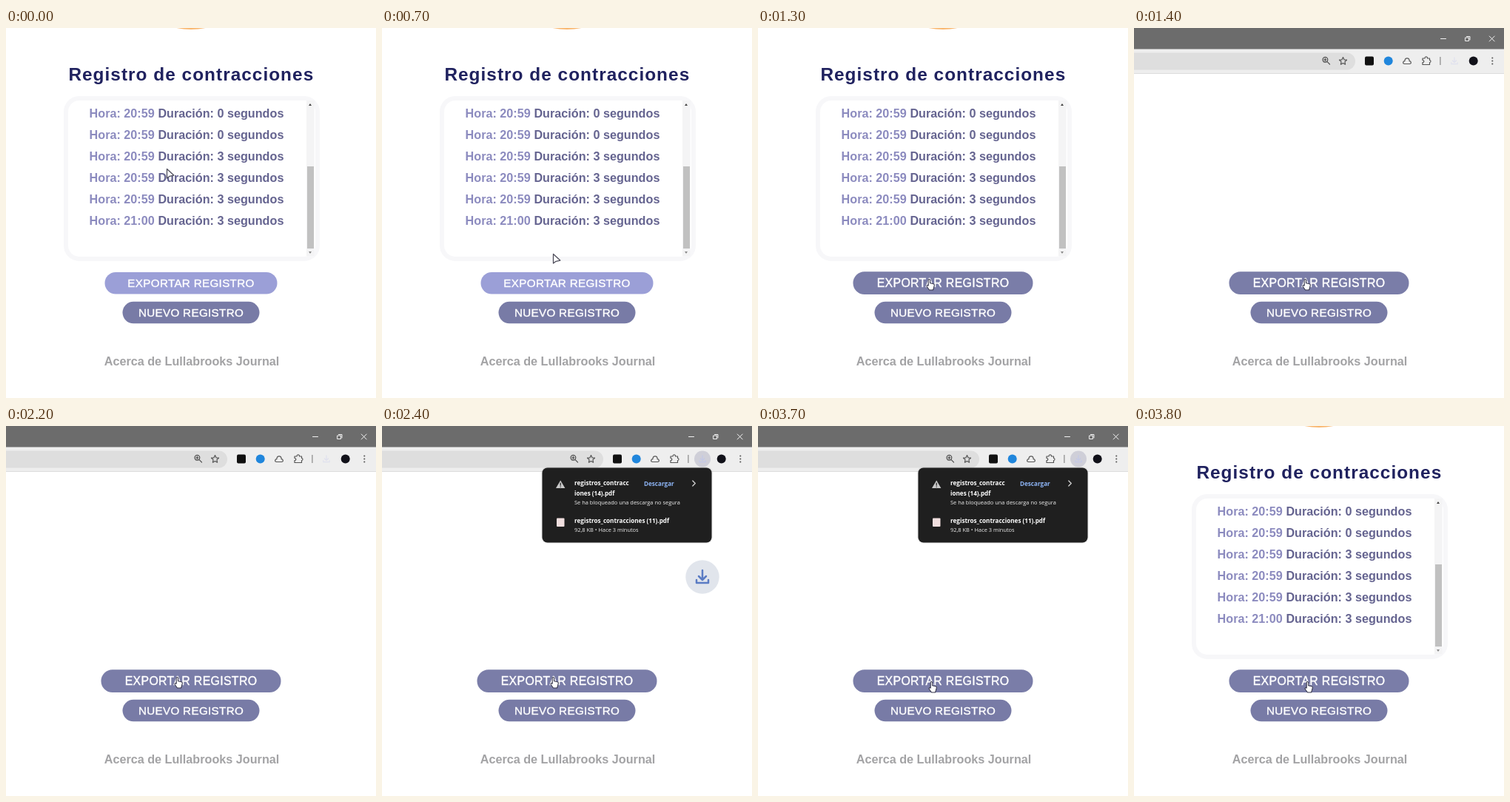
An HTML page with a canvas for the animation above (3.9 s loop, 500 by 500 pixels).

```html
<!DOCTYPE html>
<html lang="es">
<head>
<meta charset="utf-8">
<style>
html, body { margin: 0; width: 100%; height: 100%; overflow: hidden; background: #fff; }
canvas { display: block; }
</style>
</head>
<body>
<canvas id="stage" width="500" height="500"></canvas>
<script>
const ctx = document.getElementById('stage').getContext('2d');
const LOOP = 3900, STEP = 100;
const SANS = '"Liberation Sans", Arial, sans-serif';
const UI = '"Open Sans", sans-serif';

const clamp = v => Math.max(0, Math.min(1, v));
const smooth = v => { v = clamp(v); return v * v * (3 - 2 * v); };
const progress = (t, from, to) => smooth((t - from) / (to - from));

function text(str, x, y, font, color, align = 'left', spacing = 0) {
  ctx.font = font;
  ctx.fillStyle = color;
  ctx.textAlign = align;
  ctx.letterSpacing = spacing + 'px';
  ctx.fillText(str, x, y);
}

function box(x, y, w, h, r, color) {
  ctx.fillStyle = color;
  ctx.beginPath();
  ctx.roundRect(x, y, w, h, r);
  ctx.fill();
}

function disc(x, y, r, color) {
  ctx.fillStyle = color;
  ctx.beginPath();
  ctx.arc(x, y, r, 0, 7);
  ctx.fill();
}

function shape(d, x, y, { fill, stroke, width = 1.2, scale = 1 }) {
  const path = new Path2D(d);
  ctx.save();
  ctx.translate(x, y);
  ctx.scale(scale, scale);
  ctx.lineJoin = ctx.lineCap = 'round';
  if (fill) { ctx.fillStyle = fill; ctx.fill(path); }
  if (stroke) { ctx.strokeStyle = stroke; ctx.lineWidth = width; ctx.stroke(path); }
  ctx.restore();
}

function button(label, y, w, h, color, scale = 1) {
  ctx.save();
  ctx.translate(250, y);
  ctx.scale(scale, scale);
  box(-w / 2, -h / 2, w, h, h / 2, color);
  text(label, 0, 5, `15.2px ${SANS}`, '#fff', 'center', 0.33);
  ctx.strokeStyle = '#fff';
  ctx.lineWidth = 0.4;
  ctx.strokeText(label, 0, 5);
  ctx.restore();
}

function mix(a, b, k) {
  return `rgb(${a.map((v, i) => Math.round(v + (b[i] - v) * k))})`;
}

function drawRegister() {
  disc(250, -98, 100, '#f9b872');
  text('Registro de contracciones', 250.3, 71, `bold 24.4px ${SANS}`, '#20225f', 'center', 1.02);

  ctx.strokeStyle = '#f7f7f9';
  ctx.lineWidth = 6;
  ctx.beginPath();
  ctx.roundRect(81, 95, 340, 217, 18);
  ctx.stroke();

  const rows = [['20:59', 0], ['20:59', 0], ['20:59', 3], ['20:59', 3], ['20:59', 3], ['21:00', 3]];
  const font = `bold 16.2px ${SANS}`;
  rows.forEach(([hour, secs], i) => {
    const y = 120.5 + 29 * i;
    text(`Hora: ${hour}`, 112.6, y, font, '#8c8bbf');
    text(`Duración: ${secs} segundos`, 205.4, y, font, '#656490');
  });

  box(406, 98, 10.5, 210, 0, '#f4f4f5');
  box(407, 187, 9, 111, 0, '#c1c1c1');
  shape('M-2 1.5L0 -1.5L2 1.5Z', 411, 103.5, { fill: '#444' });
  shape('M-2 -1.5L0 1.5L2 -1.5Z', 411, 303.5, { fill: '#8a8a8a' });
}

const DOWNLOAD = 'M0 -9V4M-5 -1L0 4L5 -1M-8 4V8H8V4';

function drawBrowser(active) {
  box(0, 28, 500, 33, 0, '#eeeeee');
  box(0, 0, 500, 28.5, 0, '#6c6c6c');
  const light = { stroke: '#f2f2f2', width: 1 };
  shape('M-3.5 0H3.5', 418, 14.5, light);
  shape('M-3 -1.5H1.5V3H-3ZM-1.5 -3H3V1.5', 451, 14.5, light);
  shape('M-3.5 -3.5L3.5 3.5M3.5 -3.5L-3.5 3.5', 483.7, 14.5, light);

  box(0, 61, 500, 1, 0, '#dcdcdc');
  box(-20, 33.5, 319, 23, 11.5, '#dedede');

  const dark = { stroke: '#555', width: 1.2 };
  shape('M2.3 -1.2A3.4 3.4 0 1 1 -4.5 -1.2A3.4 3.4 0 1 1 2.3 -1.2M1.4 1.4L5 5M-2.7 -1.2H.5M-1.1 -2.8V.4', 259.5, 44, dark);
  shape('M0 -5L1.5 -1.7L5 -1.3L2.4 1.1L3.1 4.7L0 2.9L-3.1 4.7L-2.4 1.1L-5 -1.3L-1.5 -1.7Z', 282.5, 44.5, dark);
  box(312, 38.5, 12, 12, 2, '#111');
  disc(343.7, 44.5, 6, '#2086dc');
  shape('M-3.5 4H3.5C6 4 6 .5 3.2 .2C3 -5 -2.8 -5 -3.2 .2C-6 .5 -6 4 -3.5 4Z', 369, 44.5, dark);
  shape('M-5 -3.5H-2C-2 -6.5 1.5 -6.5 1.5 -3.5H4.5V-1C6.5 -1 6.5 2 4.5 2V5H-5V2C-2.5 2 -2.5 -1 -5 -1Z', 395, 44.5, dark);
  box(413.3, 39, 1.2, 11, 0, '#888');
  if (active) disc(433, 44.5, 11, '#cfcfd8');
  shape(DOWNLOAD, 433, 44.5, { stroke: active ? '#c3c8e6' : '#e0e1ee', width: 2.4, scale: 0.52 });
  disc(458.7, 44.5, 6, '#111119');
  for (const y of [40.5, 44.5, 48.5]) disc(484.3, y, 1.05, '#555');
}

function drawPopup() {
  ctx.save();
  ctx.shadowColor = 'rgba(0,0,0,.3)';
  ctx.shadowBlur = 2;
  box(216.5, 56.5, 229, 101, 7, '#1f1f1f');
  ctx.restore();

  const strong = `bold 8.15px ${UI}`, small = `7.45px ${UI}`;
  shape('M0 -5.5L6.2 5H-6.2Z', 241.2, 79, { fill: '#c9c9c9' });
  shape('M0 -2V1.2M0 3.2V3.3', 241.2, 79, { stroke: '#1f1f1f' });
  text('registros_contracc', 260, 80, strong, '#fff');
  text('iones (14).pdf', 260, 93.5, strong, '#fff');
  text('Descargar', 354, 81, strong, '#8db4f5');
  shape('M-1.7 -3.5L1.8 0L-1.7 3.5', 421.5, 77.5, { stroke: '#d0d0d0', width: 1.3 });
  text('Se ha bloqueado una descarga no segura', 260, 106, small, '#f0f0f0');

  box(236, 124.5, 10.5, 11.5, 1, '#f0dede');
  text('registros_contracciones (11).pdf', 260, 130.7, strong, '#fff');
  text('92,8 KB • Hace 3 minutos', 260, 142.7, small, '#f0f0f0');
}

function drawDownload(t) {
  const y = 204 - (t - 2400) * 0.8;
  ctx.save();
  ctx.globalAlpha = t < 2400 ? 0.5 : clamp(1 - (t - 2400) / 280);
  disc(433, y, 22.7, '#e1e5ec');
  shape(DOWNLOAD, 433, y, { stroke: '#5b7cc4', width: 2.5 });
  ctx.restore();
}

function drawCursor(t) {
  if (t < 900) {
    const a = progress(t, 0, 700), b = progress(t, 700, 1100);
    shape('M0 0V12.5L3.6 9.8L9.3 8.6Z', 217.5 + 14 * a - 2 * b, 190.5 + 115 * a + 35 * b,
      { fill: '#fff', stroke: '#504f5c', width: 1.3 });
    return;
  }
  const rise = 1 - progress(t, 900, 1200), nudge = clamp((t - 3200) / 200);
  shape('M2.2 8V1.3C2.2 -.5 4.6 -.5 4.6 1.3V5.2L9 6.2C10.2 6.5 10.5 7.2 10.3 8.3L9.3 12.2L8.5 14.5H3.5L.4 10.2C-.4 8.8 .8 7.4 2.2 8.6Z',
    228 + 3 * nudge, 339.5 - 8 * rise + 6 * nudge, { fill: '#fff', stroke: '#34344a', width: 1.1 });
}

function draw(t) {
  ctx.fillStyle = '#fff';
  ctx.fillRect(0, 0, 500, 500);

  const browser = t >= 1400 && t < 3800;
  if (browser) drawBrowser(t >= 2300);
  else drawRegister();

  const hover = progress(t, 800, 1200);
  button('EXPORTAR REGISTRO', 344.7, 233, 29.5, mix([155, 159, 215], [122, 125, 168], hover), 1 + 0.043 * hover);
  button('NUEVO REGISTRO', 384.6, 185, 29.5, '#787ba6');
  text('Acerca de Lullabrooks Journal', 132.7, 456, `bold 16.2px ${SANS}`, '#a3a3a5');

  if (browser && t >= 2300) drawPopup();
  if (t >= 2300 && t < 2700) drawDownload(t);
  drawCursor(t);
}

function tick(now) {
  draw(Math.floor((now % LOOP) / STEP) * STEP);
  requestAnimationFrame(tick);
}
requestAnimationFrame(tick);
</script>
</body>
</html>
```
